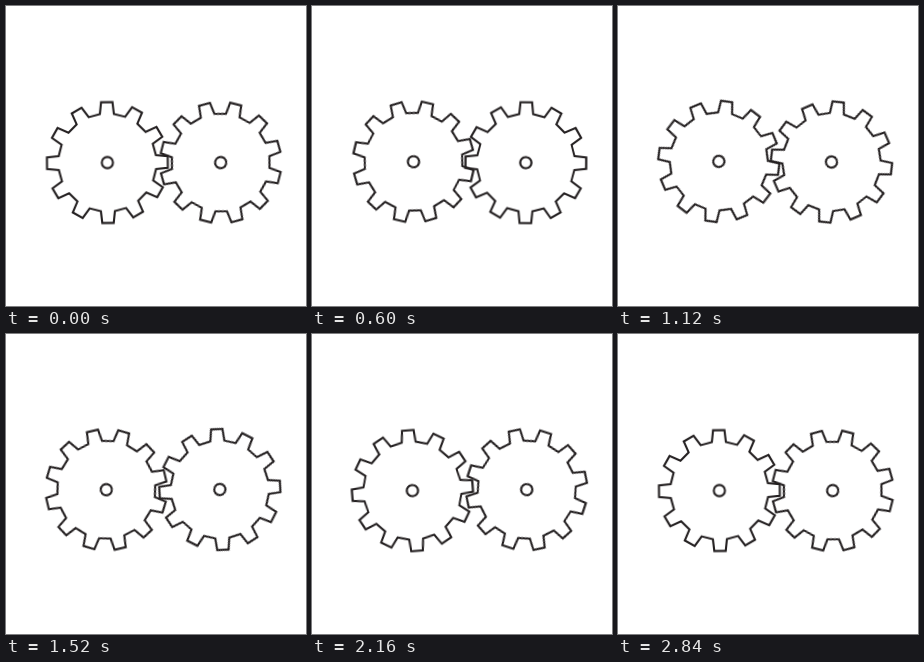
An HTML page that plays this animation: 300 px wide and 300 px high, repeating every 2.88 s.

```html
<!DOCTYPE html>
<html lang="en">
<head>
<meta charset="utf-8">
<title>Meshing gears</title>
<style>
  html, body { margin: 0; width: 100%; height: 100%; overflow: hidden; background: #fff; }
  svg { display: block; width: 100vw; height: 100vh; }
  .gear { fill: none; stroke: #231f20; stroke-width: 2.1; }
  /* 72 poses, the first and last of which coincide */
  .spin { transform-origin: 0 0; animation: spin 2880ms steps(72, jump-none) infinite; }
  .left { --turn: -360deg; }
  .right { --turn: 360deg; }
  @keyframes spin {
    from { transform: rotate(0deg); }
    to { transform: rotate(var(--turn)); }
  }
</style>
</head>
<body>
<svg viewBox="0 0 300 300">
  <defs>
    <g id="gear">
      <path id="rim"/>
      <circle r="5.6"/>
    </g>
  </defs>
  <g class="gear">
    <g transform="translate(100.9 156.1)">
      <g class="spin left"><use href="#gear" transform="translate(.5 .5) rotate(-.6)"/></g>
    </g>
    <g transform="translate(214.2 156.1)">
      <g class="spin right"><use href="#gear" transform="translate(.5 .5) rotate(14.4)"/></g>
    </g>
  </g>
</svg>
<script>
  const TEETH = 12;
  const tooth = [[-7, -48.6], [-5.7, -60.4], [5.7, -60.4], [7, -48.6]];

  const points = [];
  for (let i = 0; i < TEETH; i++) {
    const a = i * 2 * Math.PI / TEETH, c = Math.cos(a), s = Math.sin(a);
    for (const [x, y] of tooth) {
      points.push(`${(x * c - y * s).toFixed(2)} ${(x * s + y * c).toFixed(2)}`);
    }
  }
  document.getElementById('rim').setAttribute('d', `M${points.join('L')}Z`);
</script>
</body>
</html>
```
